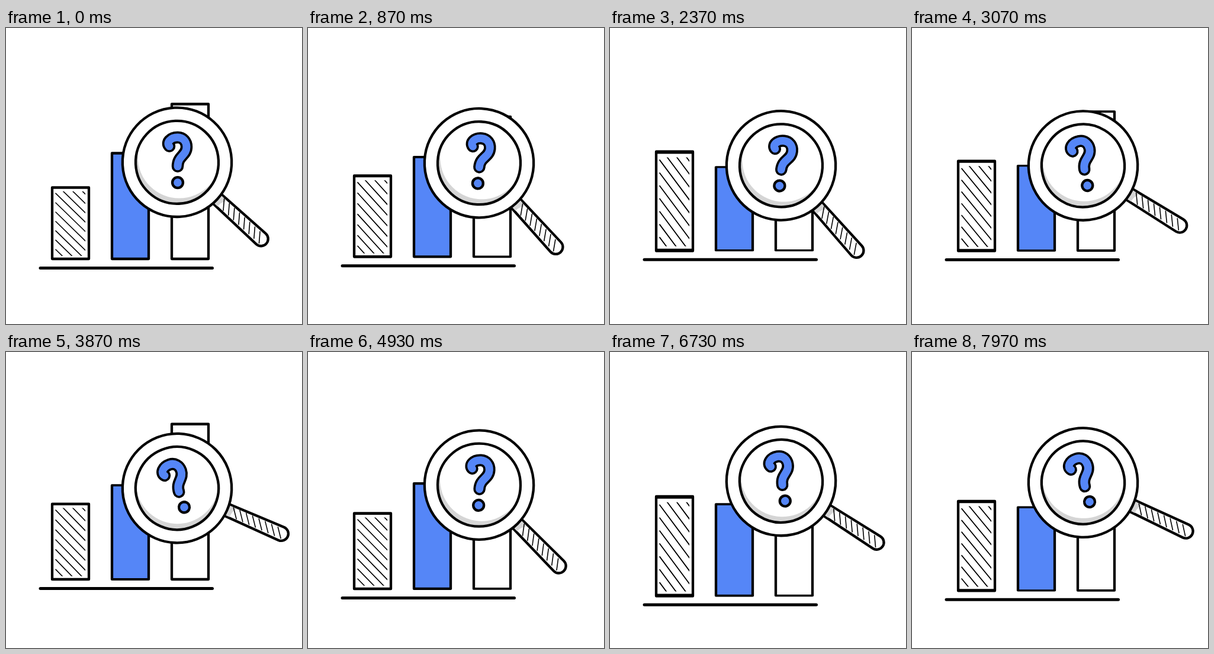
Animation of 500x500 px, one loop 8 s. Source, as an HTML page:

```html
<!DOCTYPE html>
<html lang="en">
<head>
<meta charset="utf-8">
<title>Chart under a magnifier</title>
<style>
  html, body { margin: 0; width: 100%; height: 100%; overflow: hidden; background: #fff; }
  svg { display: block; width: 100vw; height: 100vh; }
  .ink { fill: #fff; stroke: #000; stroke-width: 4.3; stroke-linejoin: round; stroke-linecap: round; }
  .ground { stroke-width: 5; }
  .blue { fill: #5586f7; }
  .ring { fill: none; }
  .hatch { fill: none; stroke: #000; stroke-width: 1.6; stroke-linecap: round; }
  .shade { fill: #d5d5d5; }
  .mark { fill: none; stroke-linecap: round; }
</style>
</head>
<body>
<svg viewBox="0 0 500 500">
  <defs>
    <clipPath id="barInside"><rect x="83" y="-114" width="51" height="109"/></clipPath>
    <clipPath id="glass"><circle r="70"/></clipPath>
    <path id="hook" d="M-13-27C-19-33-11-42 1-42C10-42 16-35 16-26C16-11 1-11 1 7"/>
  </defs>

  <!-- Bars grow upwards from y = 0 -->
  <g id="chart">
    <g id="bar1">
      <rect class="ink" x="78" y="-120.5" width="62" height="120.5"/>
      <path id="barHatch" class="hatch" clip-path="url(#barInside)"/>
    </g>
    <rect id="bar2" class="ink blue" x="179" y="-178.5" width="62" height="178.5"/>
    <rect id="bar3" class="ink" x="280" y="-261.5" width="62" height="261.5"/>
    <path class="ink ground" d="M58 15.5H348.5"/>
  </g>

  <!-- Magnifier, handle along the x axis -->
  <g id="lens">
    <path class="ink" d="M88-10.5L192-12A12 12 0 0 1 192 12L88 10.5Z"/>
    <path class="shade" d="M92-9L106-8.5Q100 0 101 9L92 9Z"/>
    <path id="gripHatch" class="hatch"/>
    <circle class="ink" r="92.2"/>
    <!-- The inside is drawn upright and turned back from the starting angle -->
    <g transform="rotate(-42.4)">
      <g clip-path="url(#glass)">
        <circle class="shade" r="70"/>
        <circle cx="3.6" cy="-9.2" r="70" fill="#fff"/>
      </g>
      <use href="#hook" class="mark" stroke="#000" stroke-width="20.5"/>
      <use href="#hook" class="mark" stroke="#5586f7" stroke-width="13"/>
      <circle class="ink blue" cx="1" cy="34.3" r="9"/>
    </g>
    <circle class="ink ring" r="70"/>
  </g>
</svg>
<script>
const LOOP = 8000, END = 10000;
const el = id => document.getElementById(id);

// A part leaves its rest value, swings between two ends and comes back to rest at END.
// It turns at `first`, then every `step` ms, `count` times in all.
const swing = (rest, ends, first, step, count) => t => {
  const turnTime = n => n < 0 ? 0 : n < count ? first + n * step : END;
  const turnValue = n => n < 0 || n >= count ? rest : ends[n % 2];
  let n = 0;
  while (t >= turnTime(n)) n++;
  const from = turnValue(n - 1), t0 = turnTime(n - 1);
  const p = (t - t0) / (turnTime(n) - t0);
  return from + (turnValue(n) - from) * p * p * (3 - 2 * p);
};

const ground = swing(390, [375, 412.3], 2720, 3600, 2);
const lensY = swing(226.8, [232.7, 218], 2800, 4000, 2);
const angle = swing(42.4, [54, 23], 1870, 1850, 4);
const bars = {
  bar1: swing(120.5, [167, 120.5], 2200, 2200, 3),
  bar2: swing(178.5, [140, 179], 2600, 2600, 3),
  bar3: swing(261.5, [200, 263], 2000, 2000, 3)
};

function strokes(count, line) {
  return Array.from({ length: count }, (_, i) => line(i)).join('');
}
el('barHatch').setAttribute('d', strokes(10, i => `M84 ${-15.8 * (i + 1)}l52 50.5`));
el('gripHatch').setAttribute('d', strokes(8, i => `M${100.5 + 11.7 * i}-8l12 15.5`));

function draw(t) {
  el('chart').setAttribute('transform', `translate(0 ${ground(t)})`);
  for (const [id, height] of Object.entries(bars)) {
    el(id).setAttribute('transform', `scale(1 ${height(t) / height(0)})`);
  }
  el('lens').setAttribute('transform', `translate(289 ${lensY(t)}) rotate(${angle(t)})`);
}

const start = performance.now();
function tick() {
  draw((performance.now() - start) % LOOP);
  requestAnimationFrame(tick);
}
tick();
</script>
</body>
</html>
```
